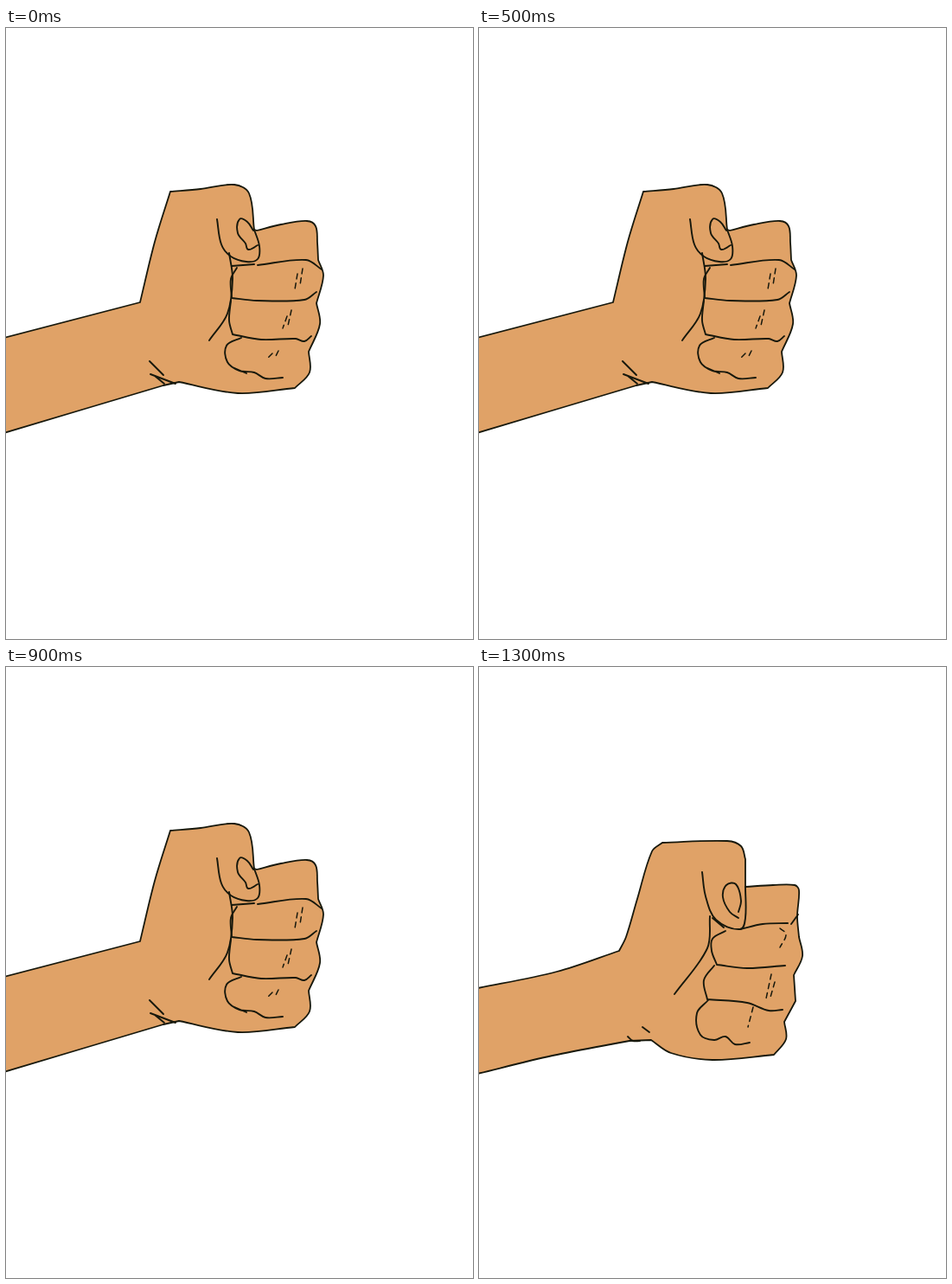
Write an HTML page that moves like this. It is 540x706 px and loops after 3300 ms.

```html
<!DOCTYPE html>
<html lang="en">
<head>
<meta charset="utf-8">
<title>Shaking fist</title>
<style>
html, body { margin: 0; width: 100%; height: 100%; overflow: hidden; background: #fff; }
svg { display: block; }
g { display: none; }
path { fill: none; stroke: #17180c; stroke-width: 1.9; stroke-linecap: round; stroke-linejoin: round; }
.skin { fill: #e0a267; stroke-width: 1.8; }
.hatch { stroke-width: 1.5; stroke-dasharray: 6 5; }
</style>
</head>
<body>
<svg width="540" height="706" viewBox="0 0 540 706">
  <g id="level">
    <path class="skin" data-points="-6,359 155,317 / 172,247 190,189 / 225,186 264,181 281,191 287,233 / 290,234 / 318,227 348,223 358,229 360,248 361,268 / 367,286 359,318 / 363,342 350,374 / 351,398 334,416 / 268,422 200,409 / 182,413 / -6,469"/>
    <path data-points="244,221 249,250 260,264 278,270 291,267 293,252 287,233 ; 291,251 280,256 277,249 268,237 270,221 279,224 286,234"/>
    <path data-points="258,260 262,290 256,330 235,361"/>
    <path data-points="261,275 287,273 ; 291,274 347,268 365,279 ; 267,277 260,290 261,312 / 290,315 345,314 359,305"/>
    <path data-points="260,315 258,338 262,354 / 295,360 335,359 345,362 353,356"/>
    <path data-points="272,358 255,367 256,386 270,396 287,398 300,405 320,404 ; 262,392 278,399"/>
    <path data-points="166,385 182,401 ; 167,400 196,411 ; 172,402 183,411"/>
    <path class="hatch" data-points="343,278 340,297 ; 337,284 334,302 ; 330,326 326,344 ; 325,333 320,347 ; 315,373 312,379 ; 308,376 302,382"/>
  </g>
  <g id="raised">
    <path class="skin" data-points="-6,316 146,238 / 142,225 145,165 150,118 165,107 / 210,101 236,95 242,98 248,109 264,137 / 314,114 / 323,119 334,140 340,168 336,182 / 344,208 335,237 / 341,262 330,282 / 335,306 / 320,323 / 260,332 180,328 / -6,419"/>
    <path data-points="264,137 273,160 271,172 254,174 235,163 218,147 ; 190,143 204,157 228,162 ; 214,146 222,162 243,177"/>
    <path data-points="245,156 235,144 234,130 244,126 252,132 262,148 260,157 245,153"/>
    <path data-points="239,177 243,210 232,259 ; 240,178 245,182 260,180"/>
    <path data-points="243,183 317,163 ; 325,163 336,187 ; 244,183 242,200 247,212 / 285,213 322,210 335,237"/>
    <path data-points="243,212 242,240 250,253 / 285,255 321,254 / 330,282 ; 262,257 245,260 240,280 247,293 263,293 272,290 285,295 312,298 ; 279,292 294,306"/>
    <path data-points="161,302 170,315 ; 166,299 176,310 ; 165,323 180,328 189,327"/>
    <path class="hatch" data-points="314,126 320,137 ; 309,173 304,192 ; 314,180 305,199"/>
    <path data-points="295,226 300,227 / 297,233 / 303,236 / 300,244 ; 282,262 287,272 / 279,274 / 284,279 / 278,285"/>
  </g>
  <g id="swing">
    <path class="skin" data-points="-6,328 70,295 138,259 149,262 157,280 / 152,200 146,145 160,120 208,105 222,118 250,156 265,174 / 263,156 254,141 / 278,123 303,115 308,121 310,133 / 308,131 / 328,225 335,310 339,412 331,461 326,465 318,464 / 250,454 183,432 / -6,474"/>
  </g>
  <g id="rest">
    <path class="skin" data-points="-6,372 90,352 162,328 / 170,312 183,268 200,213 212,203 / 287,201 303,207 308,222 / 308,254 / 340,252 365,252 370,258 368,288 370,312 / 374,334 364,356 / 366,386 / 353,410 / 355,430 341,448 / 270,454 222,446 199,431 / 174,432 / 85,449 -6,471"/>
    <path data-points="258,237 262,265 274,292 302,303 308,290 308,254 ; 300,290 290,283 282,266 286,252 297,251 303,270 300,283"/>
    <path data-points="267,288 264,325 226,378 ; 270,290 283,301"/>
    <path data-points="285,305 270,314 269,328 275,344 / 310,348 354,345 ; 302,303 328,297 357,296 ; 361,297 369,286"/>
    <path data-points="272,345 260,362 264,384 / 310,388 335,397 351,396 ; 265,385 252,400 256,425 272,431 285,427 296,436 313,434"/>
    <path data-points="172,427 178,432 186,432 ; 189,416 197,422"/>
    <path class="hatch" data-points="348,302 355,309 348,324 ; 338,355 332,383 ; 342,364 336,385 ; 317,393 311,416"/>
  </g>
</svg>
<script>
// Smooth curve through the points, with unit tangents scaled by segment length
function curve(points) {
  const tangent = i => {
    const [a, b] = points[i - 1] || points[i];
    const [c, d] = points[i + 1] || points[i];
    const size = Math.hypot(c - a, d - b) || 1;
    return [(c - a) / size, (d - b) / size];
  };
  return points.slice(1).map(([u, v], i) => {
    const [x, y] = points[i];
    const reach = Math.hypot(u - x, v - y) / 3;
    const [a, b] = tangent(i), [c, d] = tangent(i + 1);
    return `C${x + reach * a} ${y + reach * b} ${u - reach * c} ${v - reach * d} ${u} ${v}`;
  }).join('');
}

// ";" starts a new stroke, "/" makes the point before it a corner
function outline(stroke) {
  const runs = stroke.trim().split(' / ').map(run => run.split(' ').map(p => p.split(',').map(Number)));
  const pieces = runs.map((run, i) => curve(i ? [runs[i - 1].at(-1), ...run] : run));
  return `M${runs[0][0]}` + pieces.join('');
}

for (const path of document.querySelectorAll('path'))
  path.setAttribute('d', path.dataset.points.split(';').map(outline).join(''));

const poses = {
  A: ['level', 0], L: ['level', 14],
  C: ['raised', 0], U: ['raised', -8],
  B: ['swing', 0], D: ['rest', 0]
};
const order = 'ACUBLACBLACUBD', step = 100, loop = 3300;
const hands = document.querySelectorAll('g');
const start = performance.now();

function draw(now) {
  const t = Math.max(0, now - start) % loop;
  const [name, dy] = poses[order[Math.min(Math.floor(t / step), order.length - 1)]];
  for (const hand of hands) {
    hand.style.display = hand.id === name ? 'inline' : 'none';
    hand.setAttribute('transform', `translate(0 ${dy})`);
  }
  requestAnimationFrame(draw);
}
draw(start);
</script>
</body>
</html>
```
